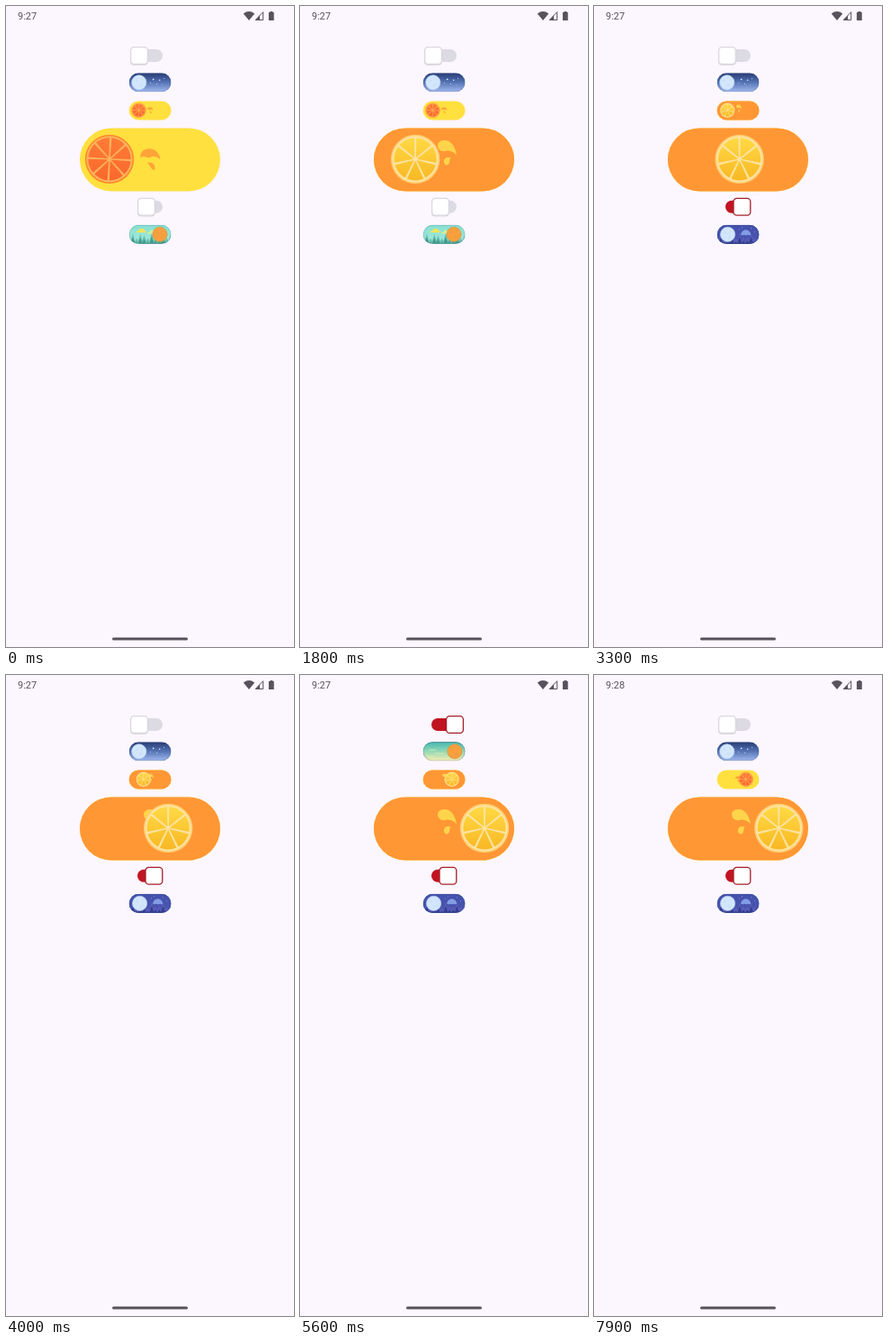
An HTML page for the animation above (8 s loop, 320x711 px).

```html
<!DOCTYPE html>
<html lang="en">
<head>
<meta charset="utf-8">
<title>Animated switches</title>
<style>
  html, body { margin: 0; width: 100%; height: 100%; overflow: hidden; background: #fcf6fe; }
  svg { display: block; width: 100vw; height: 100vh; }
  text { font: 11px Roboto, sans-serif; fill: #57525b; }
</style>
</head>
<body>
<svg id="stage" viewBox="0 0 320 711">
  <defs>
    <linearGradient id="night" x2="0" y2="1"><stop stop-color="#263b74"/><stop offset=".5" stop-color="#5674b5"/><stop offset="1" stop-color="#a2baf0"/></linearGradient>
    <linearGradient id="day" x2="0" y2="1"><stop stop-color="#45b9ae"/><stop offset=".5" stop-color="#93d8b5"/><stop offset="1" stop-color="#f7eeb0"/></linearGradient>
    <linearGradient id="dusk" x2="0" y2="1"><stop stop-color="#4450ad"/><stop offset="1" stop-color="#4a55ad"/></linearGradient>
    <linearGradient id="dawn" x2="0" y2="1"><stop stop-color="#86e0d2"/><stop offset="1" stop-color="#a5eadb"/></linearGradient>
    <linearGradient id="lemon" x2="0" y2="1"><stop stop-color="#ffd944"/><stop offset="1" stop-color="#f8b824"/></linearGradient>
    <linearGradient id="orange" x2="0" y2="1"><stop stop-color="#ff7b36"/><stop offset="1" stop-color="#fa682c"/></linearGradient>
    <clipPath id="pill"><rect width="46.8" height="21" rx="10.5"/></clipPath>
  </defs>
  <text id="clock" x="13" y="15"></text>
  <g fill="#57525b">
    <path d="M263.8 8.5Q270 3.7 276.2 8.5L270 16Z"/>
    <path d="M285.7 6.7V15.5H277.2Z" fill="none" stroke="#57525b"/>
    <path d="M282 10.5V15.5H277.2Z"/>
    <path d="M293.4 6h3v1.1h1.3V16h-5.8V7.1h1.5Z"/>
    <rect x="118" y="700.4" width="84" height="3" rx="1.5"/>
  </g>
</svg>
<script>
const LOOP = 8000;
const stage = document.getElementById('stage');
const clock = document.getElementById('clock');

function add(parent, tag, attrs = {}) {
  const el = document.createElementNS('http://www.w3.org/2000/svg', tag);
  for (const key in attrs) el.setAttribute(key, attrs[key]);
  return parent.appendChild(el);
}
const group = (parent, x, y, scale = 1) =>
  add(parent, 'g', { transform: `translate(${x} ${y}) scale(${scale})` });
const place = (el, x, y) => el.setAttribute('transform', `translate(${x} ${y})`);
const clamp = v => Math.min(1, Math.max(0, v));
const smooth = u => u * u * (3 - 2 * u);

// Slow roll: [time, progress], joined by a smooth curve.
const ROLL = [[0, 0], [.123, .045], [.368, .257], [.538, .517], [.67, .722], [.858, .93], [1, 1]];
const slope = i => {
  const a = ROLL[i - 1], b = ROLL[i + 1];
  return a && b ? (b[1] - a[1]) / (b[0] - a[0]) : 0;
};
function roll(u) {
  let i = 0;
  while (i < ROLL.length - 2 && u > ROLL[i + 1][0]) i++;
  const [x0, y0] = ROLL[i], [x1, y1] = ROLL[i + 1], w = x1 - x0;
  const s = (u - x0) / w, r = 1 - s;
  return (1 + 2 * s) * r * r * y0 + s * r * r * w * slope(i)
    + s * s * (3 - 2 * s) * y1 - s * s * r * w * slope(i + 1);
}

// Position from 0 to 1 for taps that flip a switch back and forth.
function flip(t, taps, length, ease = smooth) {
  let v = 0;
  taps.forEach((start, i) => {
    if (t >= start) {
      const p = ease(clamp((t - start) / length));
      v = i % 2 ? 1 - p : p;
    }
  });
  return v;
}

function squareSwitch(y, x0, x1, taps) {
  const track = add(stage, 'rect', { x: 146, y: y + 3, width: 28, height: 14, rx: 7 });
  const shadow = add(stage, 'rect', { width: 19.5, height: 19.5, rx: 4, fill: '#d6d2dc' });
  const thumb = add(stage, 'rect', { width: 18.8, height: 18.8, rx: 3.6, fill: '#fff', 'stroke-width': 1.3 });
  return t => {
    const x = x0 + (x1 - x0) * flip(t, taps, 300);
    const on = flip(t, taps, 120) > .5;
    track.setAttribute('fill', on ? '#c11422' : '#dcdae3');
    thumb.setAttribute('stroke', on ? '#a5202a' : '#dad7df');
    shadow.setAttribute('opacity', on ? 0 : 1);
    place(shadow, x + .2, y + 1.2);
    place(thumb, x + .6, y + .6);
  };
}

function slice(parent, c) {
  const g = add(parent, 'g');
  add(g, 'circle', { r: 27.2, fill: c.rim });
  add(g, 'circle', { r: 25.6, fill: c.pith });
  add(g, 'circle', { r: 23.6, fill: c.flesh });
  for (let i = 0; i < c.parts; i++) {
    add(g, 'path', {
      d: 'M-.7 0L-1.2-24H1.2L.7 0Z', fill: c.pith,
      transform: `rotate(${c.turn + i * 360 / c.parts})`
    });
  }
  add(g, 'circle', { r: 2.3, fill: c.pith });
  return g;
}

const ORANGE = {
  track: '#ffe03f', rim: '#ff8a2b', pith: '#ffb35c', flesh: 'url(#orange)', drop: '#ffa338',
  parts: 8, turn: 3,
  splash: 'M67.500 33C66 26 73 22 79 23C86 24 89 30 89.500 35C85 31 81 31 79 32C76 35 72 29 67.500 33Z'
    + 'M75 38.500C81 37 85 41 83 46.500C79 46 79 42 75 38.500Z'
};
const LEMON = {
  track: '#ff9735', rim: '#ffd073', pith: '#fee3a0', flesh: 'url(#lemon)', drop: '#ffd44a',
  parts: 7, turn: 0,
  splash: 'M71 19C71 14 79 12 84 15C89 18 91 24 92 30C89 26 85 25 81 25C76 27 71 24 71 19Z'
    + 'M86 32C83 34 86 40 81 41C77 40 77 35 80 33C82 32 84 33 86 32Z'
};

function fruitSwitch(x, y, scale, x0, x1, taps, length) {
  const root = group(stage, x, y, scale);
  const [off, on] = [ORANGE, LEMON].map(c => {
    const g = add(root, 'g');
    add(g, 'rect', { width: 156, height: 70, rx: 35, fill: c.track });
    add(g, 'path', { d: c.splash, fill: c.drop });
    return { g, fruit: slice(g, c) };
  });
  return t => {
    const p = flip(t, taps, length, roll);
    on.g.setAttribute('opacity', flip(t, taps, 200));
    for (const side of [off, on]) place(side.fruit, x0 + (x1 - x0) * p, 34.5);
  };
}

function starrySky(g) {
  add(g, 'rect', { width: 46.8, height: 21, fill: 'url(#night)' });
  for (const [x, y, r] of [[27, 7, .9], [34, 8, .8], [24, 11, .5], [31, 12, .5], [39, 6, .5], [37, 13, .4]])
    add(g, 'circle', { cx: x, cy: y, r, fill: '#d9e8ff' });
}
function sunnySky(g) {
  add(g, 'rect', { width: 46.8, height: 21, fill: 'url(#day)' });
  for (const [x, y, w] of [[6, 8, 9], [13, 12, 11], [4, 15, 8]])
    add(g, 'rect', { x, y, width: w, height: 1.6, rx: .8, fill: '#d6efb9', opacity: .45 });
}

function trees(g, color, base, height) {
  for (let i = 0; i < 12; i++) {
    const x = i * 4.2, h = height + 3 * Math.sin(i * 2.3);
    add(g, 'path', { d: `M${x - 3} ${base}L${x} ${base - h}L${x + 3} ${base}Z`, fill: color });
  }
}
function cloud(g, x, y, color) {
  add(g, 'path', { d: `M${x} ${y}q0-2 2.500-2q1-3 4-2q2-1 3 2q2 0 2 2Z`, fill: color });
}
function dawnForest(g) {
  add(g, 'rect', { width: 46.8, height: 21, fill: 'url(#dawn)' });
  cloud(g, 8, 8.5, '#f4e359');
  cloud(g, 20, 10, '#d4ed9a');
  trees(g, '#68bfae', 20, 8);
  trees(g, '#459b8d', 22, 6);
}
function duskForest(g) {
  add(g, 'rect', { width: 46.8, height: 21, fill: 'url(#dusk)' });
  for (const [x, y] of [[25, 5], [38, 4], [42, 8], [28, 3]])
    add(g, 'circle', { cx: x, cy: y, r: .45, fill: '#bdcaf8' });
  trees(g, '#5b5dbb', 20, 8);
  add(g, 'path', { d: 'M26.500 11a5.500 5.500 0 0 1 11 0q-2 1-3 0q-2 1-4 0q-2 1-4 0Z', fill: '#839de5' });
  trees(g, '#333f8e', 22, 6);
}

const MOON = ['#d2e6fc', '#b8d1f2'];
const SUN = ['#fb9f3e', '#c99a48'];

function skySwitch(x, y, sides, x0, x1, taps, length) {
  const root = group(stage, x, y);
  root.setAttribute('clip-path', 'url(#pill)');
  const [off, on] = sides.map(({ scene, ball }) => {
    const g = add(root, 'g');
    scene(g);
    add(g, 'rect', { x: .4, y: .4, width: 46, height: 20.2, rx: 10.1, fill: 'none', stroke: '#263b66', 'stroke-opacity': .25, 'stroke-width': .8 });
    const thumb = add(g, 'g');
    add(thumb, 'circle', { r: 8.1, fill: ball[0], stroke: ball[1], 'stroke-width': .7 });
    for (const [cx, cy, r] of [[-3, -2, 1.5], [2, 3, 1.8], [3, -3, 1]])
      add(thumb, 'circle', { cx, cy, r, fill: ball[1], opacity: .3 });
    return { g, thumb };
  });
  return t => {
    const pos = x0 + (x1 - x0) * flip(t, taps, length);
    on.g.setAttribute('opacity', flip(t, taps, length * .6));
    for (const side of [off, on]) place(side.thumb, pos, 10.5);
  };
}

const parts = [
  squareSwitch(45, 138, 162, [5000, 6050]),
  skySwitch(136.7, 74.3, [{ scene: starrySky, ball: MOON }, { scene: sunnySky, ball: SUN }], 11.1, 35.2, [4300, 6750], 600),
  fruitSwitch(136.7, 105.4, .3, 36, 108, [3000, 7700], 2800),
  fruitSwitch(82, 135.4, 1, 33, 123.3, [450], 5300),
  squareSwitch(212.8, 146, 154.4, [2300]),
  skySwitch(136.7, 242.8, [{ scene: dawnForest, ball: SUN }, { scene: duskForest, ball: MOON }], 34.3, 11.9, [1950], 600)
];

const begin = performance.now();
function draw() {
  const t = (performance.now() - begin) % LOOP;
  clock.textContent = t < 5900 ? '9:27' : '9:28';
  for (const update of parts) update(t);
  requestAnimationFrame(draw);
}
draw();
</script>
</body>
</html>
```
